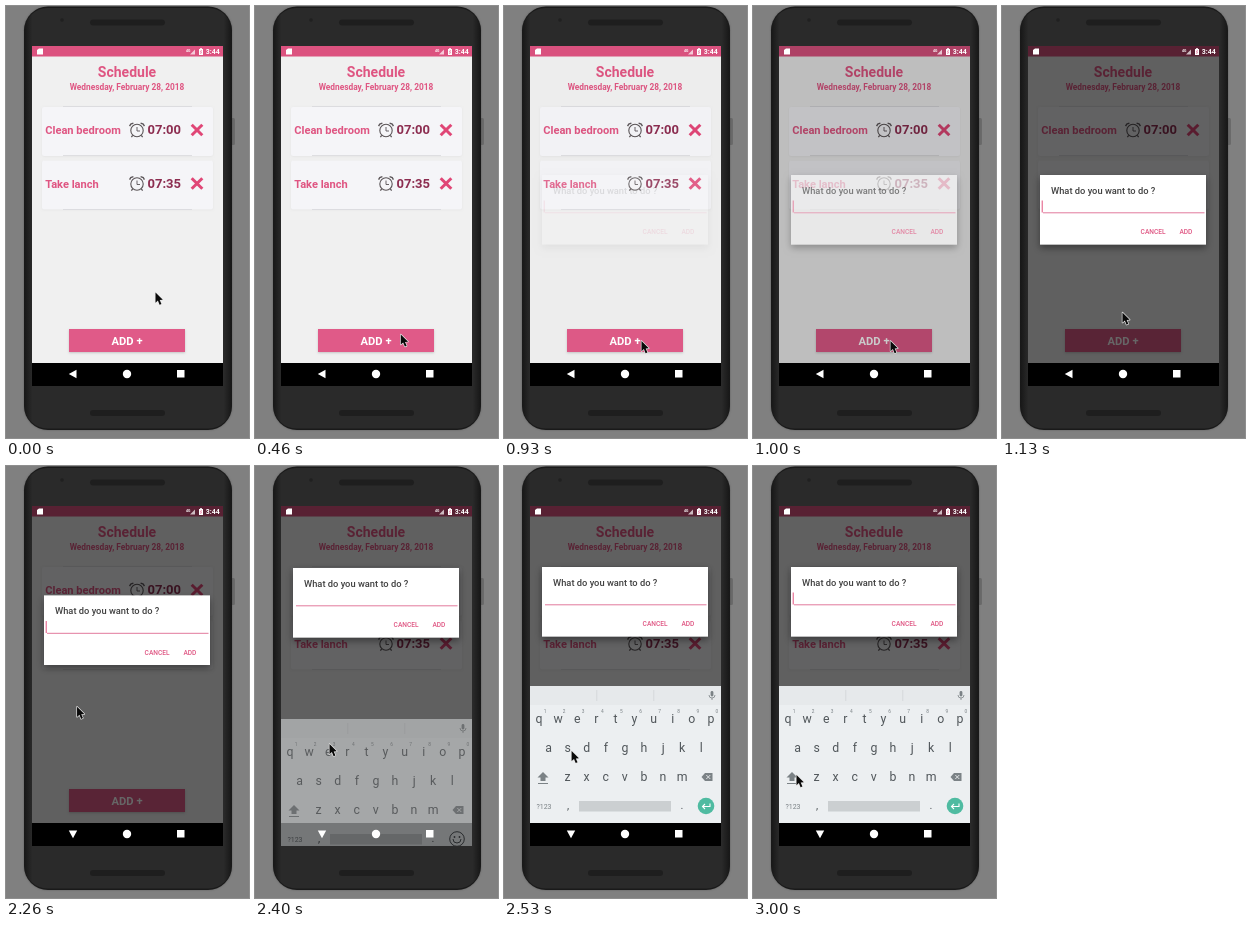
These frames come from a looping animation (243x432 px, 3.07 s). An HTML page with a canvas:

```html
<!DOCTYPE html>
<html lang="en">
<head>
<meta charset="utf-8">
<title>Schedule</title>
<style>
html, body { margin: 0; width: 100%; height: 100%; overflow: hidden; background: #808080; }
canvas { display: block; width: 243px; height: 432px; }
</style>
</head>
<body>
<canvas id="stage"></canvas>
<script>
const W = 243, H = 432, LOOP = 3070, FPS = 15;
const PINK = '#df5582', MAROON = '#8c2d50', KEY = '#50565a', SOFT = '#7b8286';
const SCREEN = { x: 26, y: 40, w: 191, bottom: 357, end: 380 };
const DIM = 0.6, KEYS_TOP = 220, PITCH = 19.1;

const canvas = document.getElementById('stage');
const dpr = window.devicePixelRatio || 1;
canvas.width = W * dpr;
canvas.height = H * dpr;
const c = canvas.getContext('2d');

// Pointer stops: time, x, y
const STOPS = [
  [0, 149, 286.5], [270, 171, 308], [530, 137, 335], [1000, 137, 335], [1133, 120, 306.5],
  [1400, 78, 257], [1930, 67, 202.5], [2130, 67, 202.5], [2400, 74, 278], [3000, 43, 309]
];

const ramp = (t, from, to) => Math.max(0, Math.min(1, (t - from) / (to - from)));
const smooth = p => p * p * (3 - 2 * p);
const easeOut = p => 1 - (1 - p) ** 3;

function rect(x, y, w, h, color) {
  c.fillStyle = color;
  c.fillRect(x, y, w, h);
}

function round(x, y, w, h, r, color) {
  c.fillStyle = color;
  c.beginPath();
  c.roundRect(x, y, w, h, r);
  c.fill();
}

function disc(x, y, r, color) {
  c.fillStyle = color;
  c.beginPath();
  c.arc(x, y, r, 0, 7);
  c.fill();
}

function ring(x, y, r, color, width = 1, to = 2 * Math.PI) {
  c.beginPath();
  c.arc(x, y, r, 0, to);
  c.strokeStyle = color;
  c.lineWidth = width;
  c.stroke();
}

function trace(pts) {
  c.beginPath();
  for (let i = 0; i < pts.length; i += 2) c.lineTo(pts[i], pts[i + 1]);
}

function poly(pts, color) {
  trace(pts);
  c.fillStyle = color;
  c.fill();
}

function line(pts, color, width = 1) {
  trace(pts);
  c.strokeStyle = color;
  c.lineWidth = width;
  c.stroke();
}

function cross(x, y, r, color, width) {
  for (const s of [-1, 1]) line([x - r, y - s * r, x + r, y + s * r], color, width);
}

function text(s, x, y, size, color, weight = 400, align = 'left') {
  c.font = `${weight} ${size}px Roboto, Arial, sans-serif`;
  c.textAlign = align;
  c.fillStyle = color;
  c.fillText(s, x, y);
}

function shadow(alpha, blur, y) {
  c.shadowColor = `rgba(0,0,0,${alpha})`;
  c.shadowBlur = blur * dpr;
  c.shadowOffsetY = y * dpr;
}

function phone() {
  rect(0, 0, W, H, '#808080');
  round(224, 112, 5, 27, 1.5, '#6a6a6a');
  const body = c.createLinearGradient(18, 0, 226, 0);
  for (const [at, color] of [[0, '#161616'], [0.04, '#2a2a2a'], [0.96, '#2a2a2a'], [1, '#161616']])
    body.addColorStop(at, color);
  c.save();
  shadow(0.3, 2, 0);
  round(18, 0.5, 208, 423.5, 24, '#1a1a1a');
  c.restore();
  round(18.5, 2, 207, 420.5, 23, body);
  disc(56, 14, 1.8, '#202020');
  for (const y of [13.5, 404]) round(84, y, 75, 6, 3, '#1e1e1e');
}

function clock(x, y) {
  const ink = '#5a5457';
  ring(x, y + 0.5, 6.2, ink, 1.1);
  line([x, y - 3, x, y + 1, x + 3, y + 1], ink, 0.9);
  for (const s of [-1, 1]) {
    line([x + s * 7.4, y - 3.8, x + s * 6.2, y - 6, x + s * 3.6, y - 6.8], ink, 1.4);
    line([x + s * 4.3, y + 5.3, x + s * 5.6, y + 7.2], ink, 1.2);
  }
}

function task(y, name, time) {
  c.save();
  shadow(0.05, 2, 0.5);
  round(36, y - 23, 171, 49, 2, '#f5f5f8');
  c.restore();
  text(name, 39.2, y + 4, 11.1, PINK, 700);
  clock(131, y);
  text(time, 141.5, y + 4.2, 13, MAROON, 700);
  cross(191, y, 5.3, '#e04676', 3);
}

function schedule() {
  rect(SCREEN.x, SCREEN.y, SCREEN.w, 318, '#f0f0f0');
  rect(SCREEN.x, SCREEN.y, SCREEN.w, 10.5, '#dc527f');
  text('Schedule', 121, 70.5, 14, PINK, 700, 'center');
  text('Wednesday, February 28, 2018', 121, 83.5, 8.35, PINK, 700, 'center');
  task(124, 'Clean bedroom', '07:00');
  task(177.5, 'Take lanch', '07:35');
  for (const y of [100, 149, 203]) rect(57, y, 129, 0.8, '#d9d9dc');
  c.save();
  shadow(0.18, 2, 0.5);
  rect(63, 323, 116, 23, '#e05a88');
  c.restore();
  text('ADD +', 121, 339, 11.2, '#fff', 700, 'center');
}

function statusIcons() {
  poly([31, 44, 33, 42.5, 37, 42.5, 37, 48.5, 31, 48.5], '#fff');
  text('4G', 180, 45.5, 3.5, '#fff', 700);
  poly([184, 48.5, 189, 48.5, 189, 43.5], 'rgba(255,255,255,.7)');
  rect(193, 43, 4, 6, '#fff');
  rect(194.2, 42, 1.6, 1, '#fff');
  line([195.5, 44, 194.5, 46, 195.5, 46, 194.5, 48], PINK, 0.6);
  text('3:44', 199.8, 48.4, 7, '#fff', 700);
}

function navIcons(typing) {
  c.save();
  c.translate(67, 368);
  if (typing) c.rotate(-Math.PI / 2);
  poly([-4.2, 0, 3.5, -4.2, 3.5, 4.2], '#fff');
  c.restore();
  disc(121, 368, 4.2, '#fff');
  rect(171, 364, 7.5, 7.5, '#fff');
}

function dialog(t) {
  const x = 38, y = 169, w = 166, h = 69.5;
  c.save();
  c.globalAlpha = ramp(t, 915, 1045);
  c.translate(0, -68 * easeOut(ramp(t, 2200, 2465)));
  // The shadow stays outside the sheet while it is translucent
  c.save();
  c.beginPath();
  c.rect(0, 0, W, H);
  c.rect(x, y, w, h);
  c.clip('evenodd');
  shadow(0.4, 7, 3);
  rect(x, y, w, h, '#fff');
  c.restore();
  rect(x, y, w, h, '#fff');
  text('What do you want to do ?', 49, 187.5, 9.3, '#414141', 500);
  rect(41, 206.3, 161.5, 1, '#e27a9d');
  if ((t - 890) % 1000 < 500) rect(39.7, 194.5, 1, 12, '#e2557f');
  text('CANCEL', 138.6, 228, 6.6, PINK, 500);
  text('ADD', 177.4, 228, 6.6, PINK, 500);
  c.restore();
}

function keyRow(keys, x, y, size = 12.3, color = KEY) {
  [...keys].forEach((k, i) => text(k, x + i * PITCH, y, size, color, 400, 'center'));
}

function actionKey(settled) {
  const x = 202, y = 340;
  if (settled) {
    disc(x, y, 8.3, '#4fbba1');
    line([x + 4, y - 2.5, x + 4, y + 0.5, x - 3.5, y + 0.5], '#fff', 1.1);
    line([x - 1, y - 2, x - 3.5, y + 0.5, x - 1, y + 3], '#fff', 1.1);
    return;
  }
  ring(x, y, 7.3, KEY);
  ring(x, y, 4, KEY, 1, Math.PI);
  for (const s of [-1, 1]) disc(x + s * 2.5, y - 2, 0.9, KEY);
}

function keyboard(t) {
  const p = ramp(t, 2300, 2500);
  if (!p) return;
  const top = KEYS_TOP + 66 * (1 - p);
  c.save();
  c.beginPath();
  c.rect(SCREEN.x, top, SCREEN.w, (p < 1 ? SCREEN.end : SCREEN.bottom) - top);
  c.clip();
  c.save();
  c.translate(0, top - KEYS_TOP);
  rect(SCREEN.x, KEYS_TOP, SCREEN.w, 160, '#eceff1');
  rect(SCREEN.x, KEYS_TOP, SCREEN.w, 19, '#e6e9eb');
  for (const x of [92.5, 149.5]) rect(x, 224, 0.7, 11, '#ced2d4');
  round(206.6, 225, 2.8, 5.5, 1.4, SOFT);
  ring(208, 229, 3, SOFT, 0.8, Math.PI);
  line([208, 232, 208, 234], SOFT, 0.8);

  keyRow('1234567890', 41, 246.5, 4.8, SOFT);
  keyRow('qwertyuiop', 35, 257);
  keyRow('asdfghjkl', 44.5, 286);
  keyRow('zxcvbnm', 63.5, 315);

  poly([39, 306, 44.5, 311.5, 33.5, 311.5], SOFT);
  rect(36.5, 311, 5, 4, SOFT);
  rect(34, 317, 10, 1, SOFT);
  poly([197.5, 311, 201, 307, 208.5, 307, 208.5, 315, 201, 315], SOFT);
  cross(204.3, 311, 2, '#eceff1', 0.9);

  text('?123', 40, 343, 7, SOFT, 400, 'center');
  text(',', 64, 343, 11, KEY, 400, 'center');
  rect(75, 335, 92, 10.5, '#cbcfd1');
  text('.', 178, 343, 11, KEY, 400, 'center');
  actionKey(p === 1);
  c.restore();

  // Fade in as one sheet: veil it with what lies behind
  rect(SCREEN.x, top, SCREEN.w, SCREEN.bottom - top, `rgba(96,96,96,${1 - p})`);
  rect(SCREEN.x, SCREEN.bottom, SCREEN.w, 23, `rgba(0,0,0,${1 - p})`);
  c.restore();
}

function pointer(t) {
  const i = Math.max(1, STOPS.findIndex(s => t <= s[0]));
  const [t0, x0, y0] = STOPS[i - 1], [t1, x1, y1] = STOPS[i];
  const p = ramp(t, t0, t1);
  c.save();
  c.translate(x0 + (x1 - x0) * p, y0 + (y1 - y0) * p);
  c.lineJoin = 'round';
  trace([0.5, 0, 0.5, 10.2, 2.9, 8.1, 4.6, 12.2, 6.4, 11.4, 4.7, 7.5, 7.8, 7.3]);
  c.closePath();
  c.strokeStyle = '#e8e8e8';
  c.lineWidth = 1.3;
  c.stroke();
  c.fillStyle = '#0a0a0a';
  c.fill();
  c.restore();
}

function draw(t) {
  c.setTransform(dpr, 0, 0, dpr, 0, 0);
  phone();
  schedule();
  const dim = DIM * smooth(ramp(t, 915, 1130));
  rect(SCREEN.x, SCREEN.y, SCREEN.w, 317, `rgba(0,0,0,${dim})`);
  statusIcons();
  rect(SCREEN.x, SCREEN.bottom, SCREEN.w, 23, '#000');
  dialog(t);
  keyboard(t);
  navIcons(t >= 2000);
  pointer(t);
}

// Pictures advance 15 times a second, on 10 ms ticks
const start = performance.now();
function tick() {
  const ms = Math.floor(((performance.now() - start) % LOOP) / 10) * 10;
  const step = Math.floor((ms + 9.99) * FPS / 1000);
  draw(Math.min(step * 1000 / FPS, 3000));
  requestAnimationFrame(tick);
}
tick();
</script>
</body>
</html>
```
